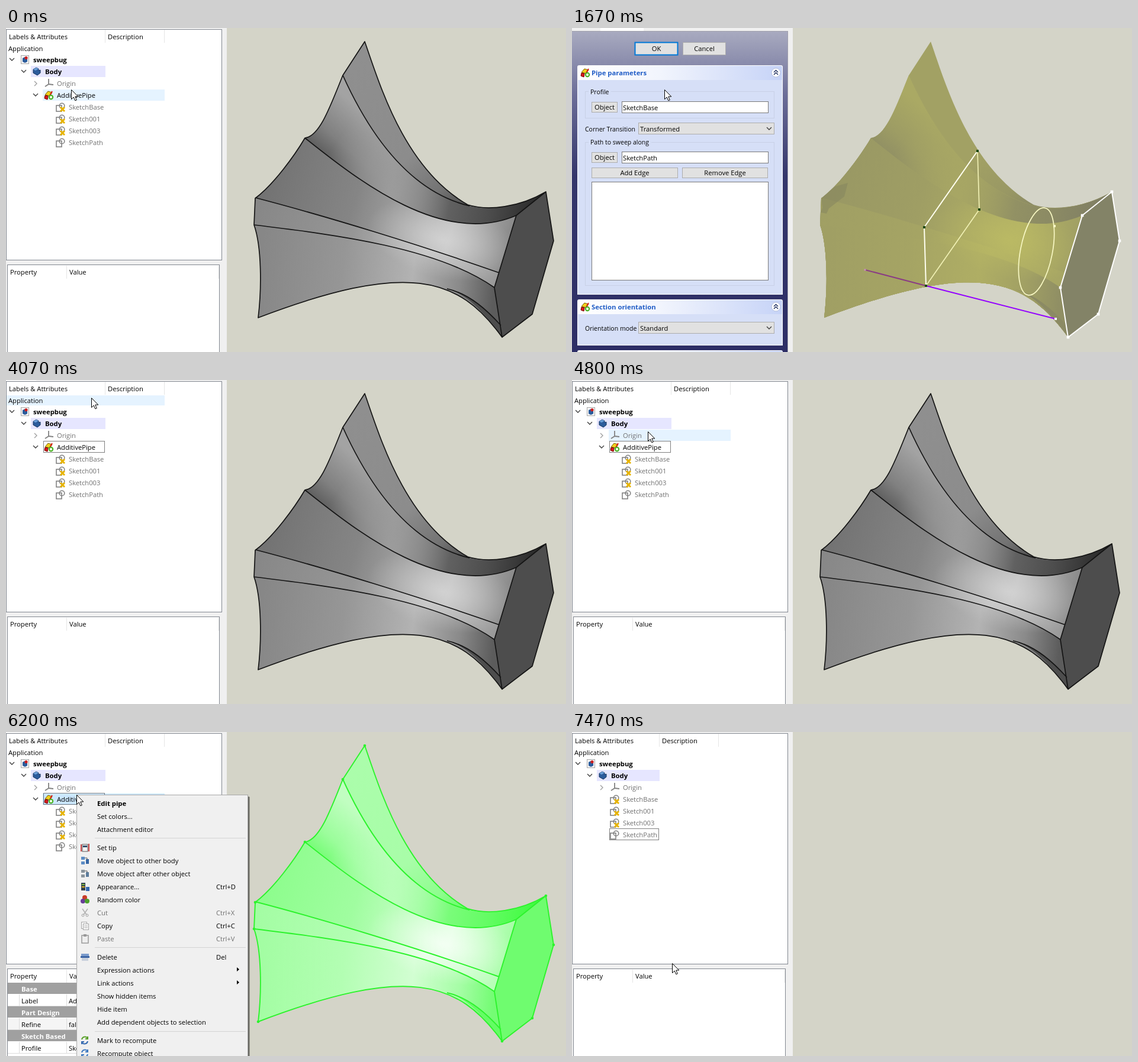
An HTML page that plays this animation: 946 px wide and 548 px high, repeating every 8 s.

```html
<!DOCTYPE html>
<html lang="en">
<head>
<meta charset="utf-8">
<title>Pipe editing</title>
<style>
  html, body { margin: 0; width: 100%; height: 100%; overflow: hidden; background: #d4d4c8; }
  svg { display: block; }
  text { font: 11.2px "Open Sans", "Noto Sans", sans-serif; fill: #000; white-space: pre; }
  .b { font-weight: 700; font-size: 11.3px; }
  .dim { fill: #707070; }
  .inv { fill: #fff; }
  .head { fill: #215dc6; }
  .mid { text-anchor: middle; }
  .caption { font-size: 10.5px; }
  .btn { fill: #e1e1e1; stroke: #adadad; }
  .btn.main { stroke: #0078d7; stroke-width: 2; }
  .btn.hot { fill: #e5f1fb; stroke: #0078d7; stroke-width: 1; }
  .btn.down { fill: #cce4f7; stroke: #005499; stroke-width: 1; }
  .field { fill: #fff; stroke: #7a7a7a; }
  .group { fill: none; stroke: #c8d0e6; }
  .focus { fill: none; stroke: #000; stroke-dasharray: 1 1; }
</style>
</head>
<body>
<svg id="stage" width="946" height="548" viewBox="0 0 946 548"></svg>
<script>
const LOOP = 8000, STEP = 200 / 3;

const text = (x, y, s, cls = '') => `<text x="${x}" y="${y}" class="${cls}">${s.replace(/&/g, '&amp;')}</text>`;
const rect = (x, y, w, h, fill, more = '') => `<rect x="${x}" y="${y}" width="${w}" height="${h}" fill="${fill}" ${more}/>`;
const box = (x, y, w, h, cls, more = '') => `<rect x="${x + .5}" y="${y + .5}" width="${w - 1}" height="${h - 1}" class="${cls}" ${more}/>`;
const path = (d, fill, stroke = 'none', w = 1, more = '') => `<path d="${d}" fill="${fill}" stroke="${stroke}" stroke-width="${w}" ${more}/>`;
const line = (d, color, w = 1, more = '') => path(d, 'none', color, w, more);
const dot = (x, y, r, fill) => `<circle cx="${x}" cy="${y}" r="${r}" fill="${fill}"/>`;
const group = (id, body) => `<g id="${id}">${body}</g>`;
const at = (x, y, body) => `<g transform="translate(${x} ${y})">${body}</g>`;
const chevron = (x, y, color = '#404040') => line(`M${x - 4} ${y - 2}l4 4 4-4`, color, 1.4);

// ---- solid model -------------------------------------------------------
const edge = {
  rim: 'C631 94 672 237 780 299',
  throat: 'C815 310 868 303 912 277',
  base: 'L838 523C764 420 678 394 426 490',
  left: 'C432 440 432 370 419 333',
  flank: 'L421 288C452 265 488 215 505 186',
  crest: 'C530 183 548 132 569 80',
  a: 'C616 184 684 277 783 301',
  b: 'C600 262 740 370 862 317',
  c: 'C540 318 700 367 833 414',
  d: 'C560 350 730 372 825 439',
  e: 'C785 450 815 480 836 503'
};
const tail = edge.base + edge.left;
const outline = `M606 23${edge.rim}${edge.throat}L925 360 889 484${tail}${edge.flank}${edge.crest}Z`;
const hexagon = 'M862 317L912 277 925 360 889 484 838 523 825 439Z';
const underside = `M745 441${edge.e}L838 523C792 458 765 447 745 441Z`;
const fanShape = `M569 80${edge.a}${edge.throat}L862 317 825 439${tail}${edge.flank}${edge.crest}Z`;
const lowerShape = `M505 186${edge.b}L825 439${tail}${edge.flank}Z`;
const ridges = `M569 80${edge.a}M505 186${edge.b}M421 287${edge.c}M419 333${edge.d}M745 441${edge.e}`;
const corners = [[606, 23], [569, 80], [505, 186], [421, 288], [419, 333], [426, 490], [912, 277], [925, 360], [889, 484], [838, 523]];
const farRim = 'L611 226Q545 282 527 325Q505 340 500 350Q480 385 464 433L426 490';
const hidden = `M606 23L605 150 613 182${farRim}`
  + 'M605 133C640 220 700 330 920 340M613 182C655 275 740 365 925 360M611 226C650 300 760 370 917 386'
  + 'M527 325C600 352 720 372 833 414M505 343C660 360 760 400 889 484M464 433C600 390 760 400 838 504';
const mouth = `M505 186L585 250${farRim.slice(8)}${edge.left}${edge.flank}Z`;

// each skin maps a light level 0..1 to a colour
const skins = {
  grey: g => [g * 255, g * 255, g * 255],
  yellow: g => [90 + g * g * 210, 89 + g * g * 210, 24 + g * g * 80],
  green: g => [17 + g * 275, 250 + g * 6, 17 + g * 275],
  olive: g => [112 + g * 90, 111 + g * 90, 100]
};

function model(skin) {
  const tone = (g, a = 1) => `rgba(${skins[skin](g).map(Math.round)},${a})`;
  let defs = '', count = 0;
  const stops = list => list.map(([o, g, a]) => `<stop offset="${o}" stop-color="${tone(g, a)}"/>`).join('');
  const shade = (x1, y1, x2, y2, list) => {
    const id = skin + 'Shade' + count++;
    defs += `<linearGradient id="${id}" gradientUnits="userSpaceOnUse" x1="${x1}" y1="${y1}" x2="${x2}" y2="${y2}">${stops(list)}</linearGradient>`;
    return `url(#${id})`;
  };
  const back = shade(600, 50, 780, 300, [[0, .56], [.6, .55], [.85, .45], [1, .3]]);
  const fan = shade(525, 215, 595, 135, [[0, .34], [.4, .5], [1, .64]]);
  const fanLight = shade(560, 190, 670, 265, [[0, .62, 0], [.5, .62, .6], [1, .62, 1]]);
  const fanDark = shade(650, 250, 912, 295, [[0, .55, 0], [.2, .5, .6], [.4, .38, 1], [.65, .3, 1], [1, .14, 1]]);
  const upper = shade(440, 270, 850, 390, [[0, .45], [.35, .52], [.6, .66], [.75, .76], [1, .52]]);
  const strip = shade(420, 310, 830, 420, [[0, .53], [.4, .59], [.7, .76], [1, .6]]);
  const lower = shade(430, 400, 825, 440, [[0, .53], [.35, .59], [.65, .7], [.85, .54], [1, .36]]);
  const glow = skin + 'Glow';
  defs += `<radialGradient id="${glow}" gradientUnits="userSpaceOnUse" cx="0" cy="0" r="130" gradientTransform="translate(738 358) rotate(14) scale(1 .5)">${stops([[0, .84, .8], [1, .8, 0]])}</radialGradient>`;

  let s = path(outline, back) + path(fanShape, fan) + path(fanShape, fanLight) + path(fanShape, fanDark)
    + path(lowerShape, upper) + path(`M421 287${edge.c}L825 439${tail}Z`, strip)
    + path(`M419 333${edge.d}${tail}Z`, lower) + path(lowerShape, `url(#${glow})`)
    + path(underside, tone(.3)) + path(hexagon, skin === 'olive' ? '#838367' : tone(.34));
  const join = 'stroke-linejoin="round"';
  if (skin === 'grey') s += path(hexagon, tone(.3)) + line(outline + ridges + hexagon, '#141414', 1.7, join);
  if (skin === 'green') s += line(outline + ridges + hexagon, '#2cf32c', 1.9, join) + corners.map(([x, y]) => dot(x, y, 2.3, '#2cf32c')).join('');
  if (skin === 'yellow') s += path(mouth, tone(.3, .5)) + line(ridges + hidden + hexagon, '#cfcf20', 1.2, join) + line(outline, '#ffff1e', 2, join);
  if (skin === 'olive') s += sketches();
  return group(skin, `<defs>${defs}</defs>${s}`);
}

function sketches() {
  const square = (x, y, c, r = 2) => rect(x - r, y - r, 2 * r, 2 * r, c);
  const frame = [[685, 208], [688, 307], [598, 436], [595, 337]];
  const hex = [[862, 317], [912, 277], [925, 360], [889, 484], [838, 523], [825, 439]];
  return path('M421 288L444 268 466 262 460 285 424 313Z M428 290L440 292 430 314 420 312Z', '#84845f', 'none', 1, 'opacity=".5"')
    + line('M685 208L688 307 598 436', '#f0f0b4', 1.7) + line('M685 208L595 337 598 436', '#fffff0', 2)
    + '<ellipse cx="784.5" cy="378" rx="27" ry="75" transform="rotate(11 784.5 378)" fill="none" stroke="#f8f8c4" stroke-width="1.7"/>'
    + line('M495 409L598 436', '#8a3c84', 2) + line('M598 436L817 492', '#9400ff', 2)
    + line(hexagon, '#fff', 2) + hex.map(p => square(...p, '#fff', 2.3)).join('')
    + frame.map(p => square(...p, '#1e4a14')).join('') + square(817, 492, '#fff') + square(495, 409, '#c890b8', 1.5) + square(815, 335, '#f8f8c4');
}

// ---- tree and property panels -------------------------------------------
const sketchIcon = linked => rect(1, 5, 9, 10, 'none', 'stroke="#828282" stroke-width="1.6"') + '<circle cx="10.5" cy="5.5" r="4.3" fill="none" stroke="#828282" stroke-width="1.6"/>'
  + (linked ? line('M8 8l7 7M15 8l-7 7', '#e8b400', 3) : '');
const cubeIcon = path('M0 4L5 1 9 3V6L12 5V10L7 14 0 10Z', '#2c5c9c', '#17345f') + path('M0 4L5 1 9 3 4 6Z', '#6b9fd8');
const pipeIcon = path('M1 7L6 1 13 3 9 9Z', '#f2d21c', '#7a5a00') + path('M1 8L6 9 5 15 0 13Z', '#d81c1c', '#700')
  + line('M13 1L9 8', '#d81c1c', 2) + '<circle cx="11" cy="11" r="3.2" fill="#e8ffe0" stroke="#45b020" stroke-width="2"/>';
const docIcon = rect(.5, .5, 13, 14, '#f4f4f4', 'stroke="#a8a8a8"') + path('M3 5L7 3 11 6V11L7 13 3 11Z', '#2c5c9c') + dot(9, 4.5, 2.6, '#cc2222');
const axesIcon = line('M7 0V9L1 13M7 9L15 10', '#828282', 1.8);

function tree(id, deleted) {
  const col = deleted ? 147 : 167, indent = deleted ? 64 : 84, top = deleted ? 114 : 134;
  const highlights = deleted ? '' : rect(62, 104, 206, 19, '#e5f3ff', 'id="rowHot"') + rect(62, 104, 206, 19, '#cce8ff', 'id="rowPicked"');
  let s = line(`M${col + .5} 3V25M${col + 100.5} 3V25`, '#e5e5e5')
    + highlights + rect(42, 64, col - 41, 19, '#e6e6ff')
    + text(5, 19, 'Labels & Attributes') + text(col + 5, 19, 'Description') + text(4, 39, 'Application')
    + chevron(10, 53) + at(25, 46, docIcon) + text(46, 58, 'sweepbug', 'b')
    + chevron(30, 73) + at(46, 66, cubeIcon) + text(66, 78, 'Body', 'b')
    + line('M48 90l4 4-4 4', '#a0a0a0', 1.4) + at(65, 86, axesIcon) + text(86, 98, 'Origin', 'dim');
  if (deleted) s += box(63, 163, 84, 20, 'focus');
  else s += chevron(50, 113) + at(65, 106, pipeIcon) + text(86, 118, 'AdditivePipe') + box(63, 103, 104, 20, 'focus', 'id="rowFocus"');
  ['SketchBase', 'Sketch001', 'Sketch003', 'SketchPath'].forEach((name, i) => {
    s += at(indent, top - 8 + i * 20, sketchIcon(i < 3)) + text(indent + 22, top + 4 + i * 20, name, 'dim');
  });
  return group(id, s);
}

const treeFrame = rect(0, 0, 373, 548, '#f0f0f0') + rect(0, 0, 51, 1, '#fff')
  + box(0, 2, 365, 391, 'field', 'style="stroke:#828790"') + box(2, 400, 359, 160, 'field', 'style="stroke:#828790"')
  + line('M102.5 402V424M359.5 402V424', '#e5e5e5') + text(7, 417, 'Property') + text(107, 417, 'Value');

function properties() {
  const rows = [['Base'], ['Label', 'AdditivePipe'], ['Part Design'], ['Refine', 'false'], ['Sketch Based'], ['Profile', 'SketchBase']];
  return group('props', rows.map(([name, value], i) => {
    const y = 424 + i * 20;
    if (!value) return rect(3, y, 357, 19, '#a0a0a0') + text(26, y + 15, name, 'b inv');
    return rect(3, y, 357, 20, i === 3 ? '#f5f5f5' : '#fff') + line(`M3 ${y + 19.5}H360M22.5 ${y}v20M102.5 ${y}v20`, '#dcdcdc')
      + text(26, y + 15, name) + text(106, y + 15, value);
  }).join(''));
}

// ---- context menu ---------------------------------------------------------
const swirl = (a, b) => line('M2 6C3 1 9 0 12 4M12 1V5H8', a, 2) + line('M12 9C11 14 5 15 2 11M2 14V10H6', b, 2);
const blocks = (a, b) => rect(1, 1, 6, 5, a) + rect(1, 9, 6, 5, a) + rect(9, 5, 5, 8, b) + line('M7 3h4v3', '#555');
const page = c => rect(1.5, 1.5, 9, 11, '#f8f8f8', `stroke="${c}"`) + rect(4.5, 4.5, 9, 10, '#f8f8f8', `stroke="${c}"`) + line('M6 8h6M6 11h6', c);
const menuItems = [
  [121, 'Edit pipe', '', '', 'b'], [143, 'Set colors...'], [165, 'Attachment editor'],
  [196, 'Set tip', '', rect(3, 2, 9, 12, '#f4f4f4', 'stroke="#555"') + rect(4, 4, 7, 3, '#36506c') + line('M1 2V14M14 1V14', '#c42020', 1.6)],
  [218, 'Move object to other body', '', blocks('#5c8cc4', '#3465a4')],
  [240, 'Move object after other object', '', blocks('#8a949c', '#5c7c9c')],
  [262, 'Appearance...', 'Ctrl+D', rect(1, 1, 7, 13, '#34424e') + rect(2, 3, 5, 2, '#7cb83c') + rect(2, 7, 5, 2, '#e0b020') + rect(9, 8, 6, 7, '#3468b0')],
  [284, 'Random color', '', dot(7, 4, 4, '#c83c28') + dot(4, 10, 4, '#683c98') + dot(11, 10, 4, '#4ca02c')],
  [306, 'Cut', 'Ctrl+X', line('M3 1L10 11M12 1L5 11', '#b0b0b0', 1.5) + '<circle cx="4" cy="12" r="2" fill="none" stroke="#a0a0a0"/><circle cx="11" cy="12" r="2" fill="none" stroke="#a0a0a0"/>', 'dim'],
  [328, 'Copy', 'Ctrl+C', page('#a8a8a8')],
  [350, 'Paste', 'Ctrl+V', rect(2, 2, 11, 13, '#eee', 'stroke="#999" stroke-width="1.5"') + rect(5, 0, 5, 4, '#999'), 'dim'],
  [381, 'Delete', 'Del', rect(1, 2, 13, 4, '#7c9ccc') + rect(0, 6, 15, 3, '#3c64a4') + rect(2, 9, 11, 5, '#c8d0dc')],
  [403, 'Expression actions', '>'], [425, 'Link actions', '>'], [447, 'Show hidden items'], [469, 'Hide item'],
  [491, 'Add dependent objects to selection'],
  [522, 'Mark to recompute', '', swirl('#58a028', '#3468b0')], [544, 'Recompute object', '', swirl('#3c78c0', '#3c78c0')]
];
const menu = group('menu',
  rect(122, 110, 290, 440, '#000', 'opacity=".25"') + rect(122, 109, 289, 440, '#000', 'opacity=".35"')
  + rect(119.5, 106.5, 289, 450, '#f0f0f0', 'stroke="#a8a8a8"')
  + rect(122, 0, 284, 22, '#91c9f7', 'id="menuHot"')
  + line('M150 179.5H405M150 364.5H405M150 506.5H405', '#d4d4d4')
  + menuItems.map(([y, label, key = '', icon = '', cls = '']) => at(126, y - 8, icon) + text(154, y + 4, label, cls)
    + (key === '>' ? path(`M390 ${y - 5}l4 3.5-4 3.5Z`, '#000') : text(355, y + 4, key, cls))).join(''));

// ---- task panel -------------------------------------------------------------
const button = (x, y, w, h, label, more = '', cls = '') => box(x, y, w, h, 'btn ' + cls, more) + text(x + w / 2, y + h / 2 + 4, label, 'mid');
const field = (y, value) => box(84, y, 248, 20, 'field') + text(86, y + 15, value);
const combo = (y, label, value) => text(22, y + 15, label, 'caption') + box(112, y, 230, 20, 'btn') + text(115, y + 15, value) + chevron(333, y + 10);
const legend = (y, w, s) => rect(28, y - 8, w, 12, '#d6dff7') + text(31, y, s, 'caption');
const section = (y, h, title) => path(`M9 ${y + h}V${y + 3}q0-3 3-3H353q3 0 3 3V${y + h}Z`, '#fff') + rect(10, y + 25, 345, h - 26, '#d6dff7')
  + path(`M10 ${y + 25}V${y + 3}q0-2 2-2H353q2 0 2 2V${y + 25}Z`, 'url(#bar)')
  + at(15, y + 5, pipeIcon) + text(33, y + 17, title, 'b head')
  + `<circle cx="344.5" cy="${y + 12.5}" r="7.5" fill="#fff" stroke="#b4bfdc"/>` + line(`M341 ${y + 12}l3.5-3.5 3.5 3.5m-7 4l3.5-3.5 3.5 3.5`, '#1c2c5c', 1.4);

const tasks = group('tasks',
  `<defs><linearGradient id="night" x2="0" y2="1"><stop stop-color="#a9abc0"/><stop offset=".2" stop-color="#6b6d98"/><stop offset=".45" stop-color="#34366b"/><stop offset="1" stop-color="#2d2e66"/></linearGradient>
   <linearGradient id="bar"><stop stop-color="#fff"/><stop offset=".4" stop-color="#f2f5fd"/><stop offset="1" stop-color="#c6d3f7"/></linearGradient></defs>`
  + rect(0, 0, 373, 548, '#f0f0f0') + rect(48, 0, 73, 5, '#fff') + rect(0, 5, 365, 543, 'url(#night)') + line('M364.5 5V548M0 5.5H365', '#a0a0ac')
  + button(106, 24, 73, 22, 'OK', 'id="ok"', 'main') + button(187, 24, 73, 22, 'Cancel')
  + section(63, 388, 'Pipe parameters')
  + box(22, 107, 320, 46, 'group') + legend(112, 38, 'Profile') + button(33, 125, 44, 18, 'Object') + field(124, 'SketchBase')
  + combo(160, 'Corner Transition', 'Transformed')
  + box(22, 193, 320, 243, 'group') + legend(197, 106, 'Path to sweep along') + button(33, 210, 44, 18, 'Object') + field(209, 'SketchPath')
  + button(33, 236, 146, 18, 'Add Edge') + button(186, 236, 145, 18, 'Remove Edge') + box(33, 260, 299, 167, 'field')
  + section(459, 78, 'Section orientation') + combo(497, 'Orientation mode', 'Standard')
  + section(545, 40, ''));

const pointer = group('pointer', path('M.5 .5V16.5L4.2 13 6.8 18.8 9.3 17.8 6.8 12H11.8Z', '#fff', '#000', 1));

const stage = document.getElementById('stage');
stage.innerHTML = rect(0, 0, 946, 548, '#d4d4c8') + Object.keys(skins).map(model).join('')
  + group('browser', treeFrame + tree('treeFull', false) + tree('treeShort', true) + properties()) + tasks + menu + pointer;

// ---- timeline -----------------------------------------------------------------
const $ = id => document.getElementById(id);
const show = (id, on) => { $(id).style.display = on ? '' : 'none'; };
const setBox = (id, values) => Object.entries(values).forEach(([k, v]) => $(id).setAttribute(k, v));
const buttons = [...stage.querySelectorAll('.btn')].map(el => ({
  el, x: +el.getAttribute('x'), y: +el.getAttribute('y'), w: +el.getAttribute('width'), h: +el.getAttribute('height')
}));
const looks = [[0, 'grey'], [470, 'yellow'], [870, 'green'], [1070, 'olive'], [4070, 'grey'], [5200, 'yellow'], [5470, 'green'], [7200, '']];
const route = [
  [0, 110, 104], [70, 129, 116], [130, 121, 117], [1669, 121, 117],
  [1670, 156, 104], [1800, 186, 215], [2000, 226, 490], [2070, 230, 527], [2200, 222, 470], [2470, 186, 192],
  [2670, 120, 162], [2800, 64, 136], [2930, 90, 60], [3000, 132, 12], [3130, 144, 30], [4470, 144, 30],
  [4930, 122, 110], [5000, 122, 110], [5330, 119, 106], [6200, 119, 106],
  [6400, 160, 260], [6670, 205, 524], [6800, 192, 470], [7000, 169, 391], [LOOP, 169, 391]
];

function pointerAt(t) {
  const i = route.findIndex(k => k[0] > t);
  const [t0, x0, y0] = route[i - 1], [t1, x1, y1] = route[i];
  const u = (t - t0) / (t1 - t0);
  return [Math.round(x0 + (x1 - x0) * u), Math.round(y0 + (y1 - y0) * u)];
}

function render(time) {
  const t = Math.round(Math.floor((time + 2) / STEP) * STEP / 10) * 10 % LOOP;
  const within = (a, b) => t >= a && t < b;
  const [x, y] = pointerAt(t);
  $('pointer').setAttribute('transform', `translate(${x} ${y})`);

  const look = looks.filter(k => k[0] <= t).pop()[1];
  Object.keys(skins).forEach(s => show(s, s === look));

  const editing = within(1070, 4070), deleted = t >= 7200, picked = within(870, 1070) || within(5470, 7200);
  show('browser', !editing);
  show('tasks', editing);
  show('treeFull', !deleted);
  show('treeShort', deleted);
  show('props', within(930, 1070) || within(5530, 7200));
  show('rowPicked', picked);
  show('rowFocus', t >= 870);

  const row = Math.floor((y - 24) / 20), hovering = !picked && row >= 0 && row < 5;
  show('rowHot', hovering);
  if (hovering) {
    const left = [1, 22, 42, 62, 62][row];
    setBox('rowHot', { x: left, width: 268 - left, y: row ? 24 + row * 20 : 26, height: row ? 19 : 17 });
  }

  show('menu', within(5600, 7070));
  $('menu').style.opacity = Math.min(1, (t - 5530) / 200);
  const item = menuItems.find(m => Math.abs(m[0] - y) <= 11);
  show('menuHot', t > 6200 && item && x > 120);
  if (item) setBox('menuHot', { y: item[0] - 11 });

  for (const b of buttons) b.el.classList.toggle('hot', editing && x >= b.x && x <= b.x + b.w && y >= b.y && y <= b.y + b.h);
  $('ok').classList.toggle('down', within(3800, 3930));
}

function tick() {
  render(performance.now() % LOOP);
  requestAnimationFrame(tick);
}
tick();
</script>
</body>
</html>
```
